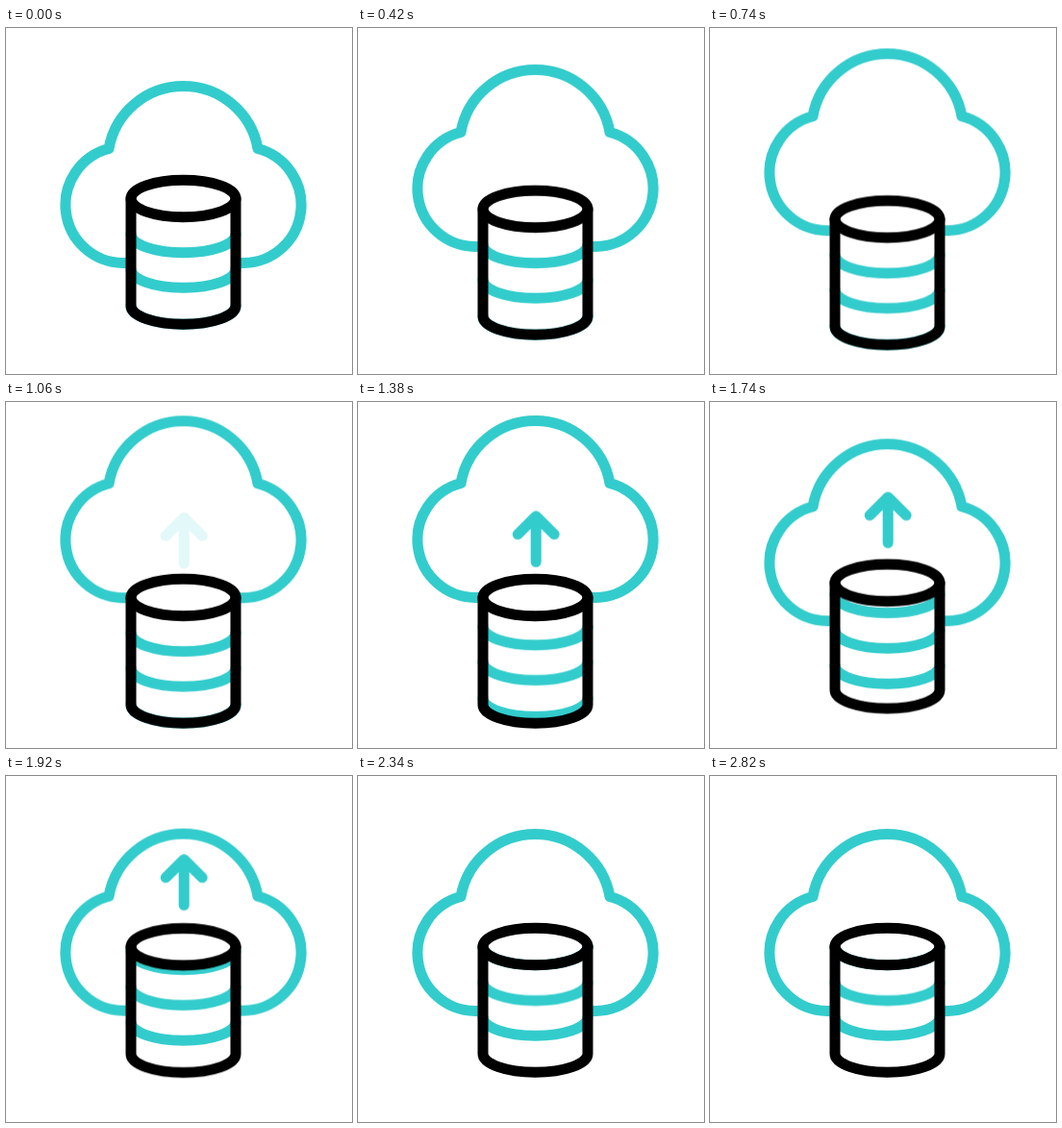
Write an HTML page that moves like this. It is 360x360 px and loops after 3020 ms.

```html
<!DOCTYPE html>
<html lang="en">
<head>
<meta charset="utf-8">
<title>Cloud database upload</title>
<style>
  html, body { margin: 0; height: 100%; overflow: hidden; background: #fff; }
  svg { display: block; width: 100vw; height: 100vh; }
  path, ellipse {
    fill: none; stroke: #3cc; stroke-width: 11;
    stroke-linecap: round; stroke-linejoin: round;
  }
  .cloud path { stroke-linecap: butt; }
  .shell { stroke: #000; }

  .cloud, .drum, .stripe, .arrow { animation: 3020ms linear infinite; }
  .cloud { --far: -41px; animation-name: part; }
  .drum { --far: 26px; animation-name: part; }
  .stripe { animation-name: rise; }
  .arrow { --step: -9px; animation-name: rise, fade; }

  /* cloud and drum move apart, wait, then close again */
  @keyframes part {
    0% { transform: translateY(0); }
    6.62% { transform: translateY(0); animation-timing-function: cubic-bezier(.333, .667, .667, 1); }
    37.6% { transform: translateY(var(--far)); }
    48.84% { transform: translateY(var(--far)); animation-timing-function: ease-in-out; }
    64.74%, 100% { transform: translateY(0); }
  }
  /* each stripe climbs to the next slot */
  @keyframes rise {
    0% { transform: translateY(0); }
    34.11% { transform: translateY(0); animation-timing-function: ease-in-out; }
    73.18%, 100% { transform: translateY(var(--step)); }
  }
  @keyframes fade {
    0%, 34.11% { opacity: 0; }
    41.72%, 65.56% { opacity: 1; }
    73.18%, 100% { opacity: 0; }
  }
</style>
</head>
<body>
<svg viewBox="0 0 360 360">
  <g class="cloud">
    <path d="M129 244.5H121.5A60.5 60.5 0 0 1 107 125.5A78.7 78.7 0 0 1 262 125.5A60.5 60.5 0 0 1 247.5 244.5H240"/>
  </g>
  <g class="drum">
    <path class="arrow" d="M166.2 113.3L185.2 94.5L204.2 113.3M185.2 94.5V142"/>
    <path class="stripe" style="--step:-37px" d="M130 214.5a54.5 19.2 0 0 0 109 0"/>
    <path class="stripe" style="--step:-36.5px" d="M130 251a54.5 19.2 0 0 0 109 0"/>
    <path class="stripe" style="--step:-38px" d="M130 289a54.5 19.2 0 0 0 109 0"/>
    <ellipse class="shell" cx="184.5" cy="177.5" rx="54.5" ry="19.2"/>
    <path class="shell" d="M130 177.5V289a54.5 19.2 0 0 0 109 0V177.5"/>
  </g>
</svg>
</body>
</html>
```
